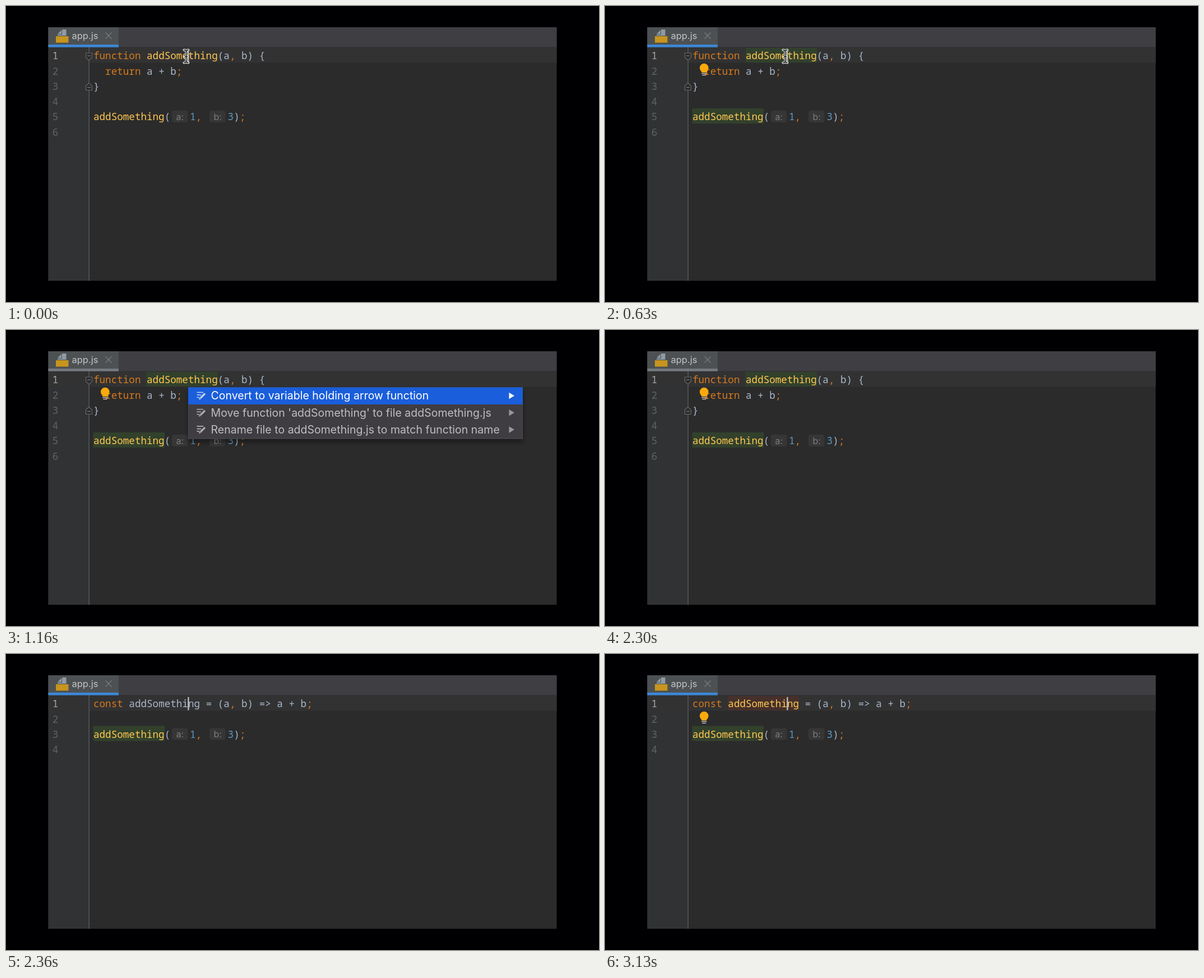
An HTML page that plays this animation: 1058 by 529 pixels, repeating every 6.2 s.

```html
<!DOCTYPE html>
<html lang="en">
<head>
<meta charset="utf-8">
<title>Editor quick fix</title>
<style>
  html, body { margin: 0; width: 100%; height: 100%; overflow: hidden; background: #000; }
  svg { display: block; width: 100vw; height: 100vh; }
  .code { font: 500 17.6px "Noto Sans Mono", "DejaVu Sans Mono", monospace; }
  .ui { font-family: Inter, Roboto, sans-serif; }
</style>
</head>
<body>
<svg id="stage" viewBox="0 0 1058 529"></svg>
<script>
const LOOP = 6200;
const LEFT = 156, ADVANCE = 10.56, BASELINE = 95.4, PITCH = 27.25;
const INK = { key: '#d67a1c', fn: '#ffc751', num: '#5f98c0', text: '#a9b7c8' };
const stage = document.getElementById('stage');

const rect = (x, y, w, h, fill, more = '') =>
  `<rect x="${x}" y="${y}" width="${w}" height="${h}" fill="${fill}" ${more}/>`;
const line = (d, stroke, width, more = '') =>
  `<path d="${d}" fill="none" stroke="${stroke}" stroke-width="${width}" ${more}/>`;
const label = (x, y, size, fill, text) =>
  `<text class="ui" x="${x}" y="${y}" font-size="${size}" fill="${fill}">${text}</text>`;
const code = (x, row, fill, text) =>
  `<text class="code" x="${x}" y="${BASELINE + row * PITCH}" fill="${fill}">${text.replace('>', '&gt;')}</text>`;
const column = n => LEFT + n * ADVANCE;

// Tokens are [column, ink, text].
const codeLine = (row, tokens) =>
  tokens.map(([col, ink, text]) => code(column(col), row, INK[ink], text)).join('');

const nameMark = (row, col, fill) =>
  rect(column(col) - .5, 75 + row * PITCH - (row ? 1 : 0), 12 * ADVANCE + .8, row ? 27 : 26, fill);

function lineNumbers(count) {
  let out = '';
  for (let i = 0; i < count; i++) out += code(82.8, i, i ? '#606366' : '#a9a9ab', String(i + 1));
  return out;
}

function hint(x, row, text) {
  const y = 78 + row * PITCH;
  return rect(x, y, 28.5, 21, '#363637', 'rx="4"') + label(x + 7.5, y + 16.5, 16, '#7c7c7e', text);
}

function callLine(row, marked) {
  return (marked ? nameMark(row, 0, '#32412c') : '') +
    codeLine(row, [[0, 'fn', 'addSomething'], [12, 'text', '(']]) +
    hint(296, row, 'a:') + code(328, row, INK.num, '1') + code(338.6, row, INK.key, ',') +
    hint(363, row, 'b:') + code(395.6, row, INK.num, '3') +
    code(406.2, row, INK.text, ')') + code(416.8, row, INK.key, ';');
}

function foldMark(y, dir) {
  const sides = `M142.5 ${y - 6 * dir}H153.5V${y + 2 * dir}L148 ${y + 7 * dir}L142.5 ${y + 2 * dir}Z`;
  return `<path d="${sides}" fill="#2b2b2c" stroke="#66686a" stroke-width="1.2"/>` +
    line(`M145 ${y - dir}H151`, '#77797b', 1.3);
}

function functionCode(marked) {
  return lineNumbers(6) + foldMark(90, 1) + foldMark(144.5, -1) +
    (marked ? nameMark(0, 9, '#32412c') : '') +
    codeLine(0, [[0, 'key', 'function'], [9, 'fn', 'addSomething'], [21, 'text', '(a'],
      [23, 'key', ','], [25, 'text', 'b) {']]) +
    codeLine(1, [[2, 'key', 'return'], [9, 'text', 'a + b'], [14, 'key', ';']]) +
    codeLine(2, [[0, 'text', '}']]) +
    callLine(4, marked);
}

function arrowCode(marked) {
  return lineNumbers(4) + (marked ? nameMark(0, 6, '#45302b') : '') +
    codeLine(0, [[0, 'key', 'const'], [6, marked ? 'fn' : 'text', 'addSomething'],
      [19, 'text', '= (a'], [23, 'key', ','], [25, 'text', 'b) => a + b'], [36, 'key', ';']]) +
    callLine(2, true);
}

function bulb() {
  return '<path d="M172.5 119C172.5 116.5 169 115 169 110.5A7.8 7.8 0 0 1 184.6 110.5C184.6 115 181 116.5 181 119Z" fill="#fba90d"/>' +
    line('M172.3 120.8H181.3M173.3 123.6H180.3', '#c3c5c7', 1.4);
}

function pointer() {
  const beam = 'M317.5 78.5Q321.5 78.5 321.5 82V98Q321.5 101.5 317.5 101.5M325.5 78.5Q321.5 78.5 321.5 82M321.5 98Q321.5 101.5 325.5 101.5M319 90.5H324';
  return line(beam, '#d8d8d8', 4, 'stroke-linecap="round"') + line(beam, '#1c1c1c', 1.5);
}

function menu() {
  const items = ['Convert to variable holding arrow function',
    "Move function 'addSomething' to file addSomething.js",
    'Rename file to addSomething.js to match function name'];
  const rows = items.map((text, i) => {
    const y = 117.5 + i * 30.3, ink = i ? '#bdbdc0' : '#fff', icon = i ? '#b0b1b4' : '#c5d3ee';
    return line(`M340.5 ${y - 6}H352M340.5 ${y - 1.5}H348M340.5 ${y + 3}H345`, icon, 1.6) +
      line(`M347 ${y + 4}L355 ${y - 4}`, icon, 3.2) +
      `<path d="M344 ${y + 7}L345.2 ${y + 3.2}L348 ${y + 6}Z" fill="${icon}"/>` +
      label(365.5, y + 6.7, 19.55, ink, text) +
      `<path d="M897.5 ${y - 5.8}L907 ${y}L897.5 ${y + 5.8}Z" fill="${i ? '#97979b' : '#fff'}"/>`;
  }).join('');
  return rect(325, 102, 597, 92.5, '#3f3e43', 'filter="url(#shadow)"') +
    rect(325.5, 102.5, 596, 91.5, 'none', 'stroke="#4b4b50"') +
    rect(325, 102.5, 597, 30.5, '#1a5edb') + rows;
}

const windowFrame = () =>
  '<defs><filter id="shadow" x="-5%" y="-20%" width="110%" height="160%">' +
  '<feDropShadow dx="0" dy="6" stdDeviation="4" flood-color="#000" flood-opacity=".4"/></filter></defs>' +
  rect(0, 0, 1058, 529, '#000002') +
  rect(75.5, 38, 907, 453, '#2b2b2c') +
  rect(75.5, 73, 72.5, 418, '#313234') +
  rect(75.5, 73, 907, 28.5, '#323233') +
  rect(75.5, 38, 907, 35, '#3f3e43') +
  rect(75.5, 38, 125.5, 35, '#4d5153') +
  line('M148.2 73.5V491', '#57585a', 1.5) +
  '<path d="M92 50L99 43V50ZM100 42H107.5V53H92V51H100Z" fill="#8f9ba4"/>' +
  rect(89, 54, 22.5, 11.5, '#c7941d') +
  label(117.5, 59, 16.5, '#c2c3c5', 'app.js') +
  line('M177.5 47.5L188.5 58.5M188.5 47.5L177.5 58.5', '#777b7e', 1.3);

function scene(time) {
  const menuOpen = time >= 1160 && time < 2300;
  const unfocused = time >= 1160 && time < 2330;
  const converted = time >= 2360;
  const bulbShown = time >= 630 && time < 2360 || time >= 3130;
  return windowFrame() +
    rect(75.5, 69, 125.5, 4.7, unfocused ? '#747a7f' : '#3c87d6') +
    (converted ? arrowCode(time >= 2660) : functionCode(time >= 100)) +
    (unfocused ? '' : rect(324.3, 77, 2.2, 23.5, '#c4c4c6')) +
    (bulbShown ? bulb() : '') +
    (time < 1060 ? pointer() : '') +
    (menuOpen ? menu() : '');
}

let shown = '';
function draw(now) {
  const next = scene(now % LOOP);
  if (next !== shown) stage.innerHTML = shown = next;
}

const start = performance.now();
function tick() {
  draw(performance.now() - start);
  requestAnimationFrame(tick);
}
tick();
</script>
</body>
</html>
```
